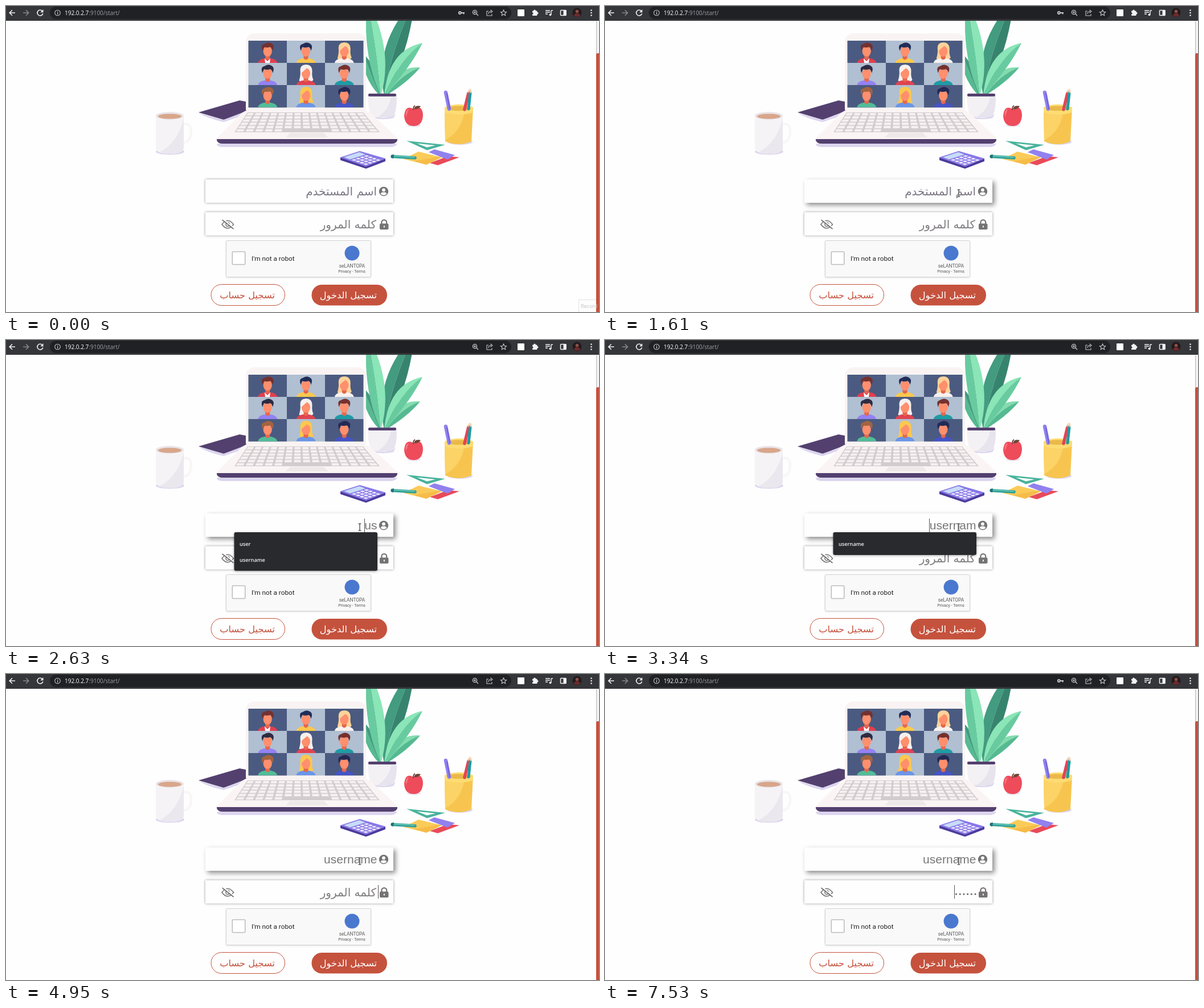
Animation, 1041 px wide and 538 px high, one loop 8 s. Source, as an HTML page with a canvas:

```html
<!DOCTYPE html>
<html lang="en">
<head>
<meta charset="utf-8">
<title>Login form</title>
<style>
html, body { margin: 0; width: 100%; height: 100%; overflow: hidden; background: #fefefe; }
canvas { display: block; width: 1041px; height: 538px; }
</style>
</head>
<body>
<canvas id="stage" width="1041" height="538"></canvas>
<script>
const W = 1041, H = 538, LOOP = 8000;
const RED = '#c5523d', GREY = '#757373', PAGE = '#fefefe';
const ARABIC = '"DejaVu Sans", sans-serif';
const UI = '"Open Sans", "Noto Sans", sans-serif';
const view = document.getElementById('stage').getContext('2d');
const backdrop = document.createElement('canvas');
backdrop.width = W;
backdrop.height = H;
let g = backdrop.getContext('2d');

// ---------- helpers ----------
function fill(color, d) {
  g.fillStyle = color;
  g.fill(new Path2D(d), 'evenodd');
}
function line(color, width, d) {
  g.strokeStyle = color;
  g.lineWidth = width;
  g.stroke(new Path2D(d));
}
function oval(color, x, y, rx, ry = rx) {
  g.fillStyle = color;
  g.beginPath();
  g.ellipse(x, y, rx, ry, 0, 0, Math.PI * 2);
  g.fill();
}
function ring(color, width, x, y, r) {
  g.strokeStyle = color;
  g.lineWidth = width;
  g.beginPath();
  g.arc(x, y, r, 0, Math.PI * 2);
  g.stroke();
}
function box(color, x, y, w, h, r = 0) {
  g.fillStyle = color;
  g.beginPath();
  g.roundRect(x, y, w, h, r);
  g.fill();
}
function frame(color, width, x, y, w, h, r = 0) {
  g.strokeStyle = color;
  g.lineWidth = width;
  g.beginPath();
  g.roundRect(x, y, w, h, r);
  g.stroke();
}
function text(str, x, y, font, color, align = 'left', dir = 'ltr') {
  g.font = font;
  g.fillStyle = color;
  g.direction = dir;
  g.textAlign = align;
  g.fillText(str, x, y);
}
function at(x, y, draw) {
  g.save();
  g.translate(x, y);
  draw();
  g.restore();
}
function shaded(color, blur, dx, dy, draw) {
  g.save();
  g.shadowColor = color;
  g.shadowBlur = blur;
  g.shadowOffsetX = dx;
  g.shadowOffsetY = dy;
  draw();
  g.restore();
}
const mix = (a, b, k) => a + (b - a) * k;

// ---------- browser bar ----------
function browserBar() {
  box('#35363a', 0, 0, W, 26);
  box('#202124', 77, 1, 810, 22, 11);
  const white = '#f1f3f4', dim = '#85888c', soft = '#c4c7ca';
  line(white, 1.6, 'M16 12H6.5M11 7.2L6.2 12L11 16.8');
  line(dim, 1.6, 'M30 12H39.5M35 7.2L39.8 12L35 16.8');
  line(white, 1.6, 'M64 9A5 5 0 1 0 64.8 13.2');
  fill(white, 'M65.5 6V11.2H60.3Z');
  ring(soft, 1.1, 90.5, 12, 4.8);
  box(soft, 90, 11, 1.2, 4);
  box(soft, 90, 9, 1.2, 1.2);
  const host = '192.0.2.7';
  text(host, 103, 15.5, '10px ' + UI, '#fff');
  text(':9100/start/', 103 + g.measureText(host).width, 15.5, '10px ' + UI, '#9aa0a6');
  ring(soft, 1.3, 823, 11, 3.6);
  line(soft, 1.4, 'M825.8 13.8L829 17M821.3 11H824.7M823 9.3V12.7');
  line(soft, 1.1, 'M847 9H844V17H853V14M847 14Q847 9.5 852 9.5M850.5 6.8L854 9.5L850.5 12.2');
  line(soft, 1.1, 'M873.5 6.8L875 10.2L878.6 10.6L875.9 13L876.7 16.6L873.5 14.7L870.3 16.6L871.1 13L868.4 10.6L872 10.2Z');
  box('#fff', 898, 6, 12, 12, 1);
  box(white, 924, 8.5, 8.5, 8.5, 1);
  oval(white, 928, 8.5, 1.9);
  oval(white, 932.6, 12.6, 1.9);
  oval('#35363a', 924.2, 13, 1.4);
  line(white, 1.4, 'M947 8H955M947 11H955M947 14H951M957 8V15M957 8H960');
  oval(white, 955.5, 15.3, 1.9);
  frame(white, 1.5, 973.5, 7.5, 9.5, 9, 1);
  box(white, 978.5, 7, 5, 10);
  oval('#231a1c', 1002.5, 11.5, 8);
  oval('#8c5148', 1002.5, 9.5, 2.8);
  fill('#6e2a2d', 'M997 17Q998 12.5 1002.5 12.5Q1007 12.5 1008 17Q1002.5 21 997 17Z');
  [7.5, 12, 16.5].forEach(y => oval(white, 1027.5, y, 1.3));
}
function keyIcon() {
  ring('#c4c7ca', 1.8, 796.8, 12, 2);
  line('#c4c7ca', 1.8, 'M799 12H805M803.5 12V14.5');
}

// ---------- illustration ----------
function leaf(x0, y0, x1, y1, cx, cy, w, colors) {
  const len = Math.hypot(x1 - x0, y1 - y0);
  const nx = -(y1 - y0) / len * w, ny = (x1 - x0) / len * w;
  [-1, 1].forEach((side, i) => fill(colors[i],
    `M${x0} ${y0}Q${cx + nx * side} ${cy + ny * side} ${x1} ${y1}Q${cx} ${cy} ${x0} ${y0}Z`));
}
function plant() {
  g.save();
  g.beginPath();
  g.rect(632, 26, 120, 180);
  g.clip();
  leaf(664, 158, 718, -12, 676, 75, 33, ['#439b80', '#37846e']);
  leaf(656, 158, 626, 82, 640, 118, 17, ['#55ba91', '#439b80']);
  leaf(666, 158, 727, 108, 693, 120, 19, ['#83dcae', '#55ba91']);
  leaf(664, 158, 731, 65, 691, 92, 25, ['#8ae5b7', '#68cb9f']);
  leaf(658, 158, 634, -12, 653, 82, 29, ['#68cb9f', '#8ae5b7']);
  g.restore();
  fill('#dcd5ee', 'M638 190Q662 204 684 190L680 197Q662 201 642 197Z');
  fill('#f4f1f5', 'M635 155H686Q686 187 679 194Q661 198 643 194Q635 186 635 155Z');
  fill('#e8e4ee', 'M676 160H686Q686 187 679 194Q664 198 651 196Q672 184 676 160Z');
  box('#54406f', 636, 154, 49, 5, 2);
}
function person(x, y, hair, shirt, long) {
  at(x, y, () => {
    if (long) fill(hair, 'M-10 13Q-10 3 0 3Q11 3 11 15Q10 23 13 30Q8 36 0 34Q-8 36 -12 31Q-9 22 -10 13Z');
    fill(shirt, 'M-17 39Q-16 33 -6 31H6Q16 33 17 39Z');
    fill('#e6674d', 'M-4 24H4V31Q0 36 -4 31Z');
    oval('#ff8f6d', 0, 18.5, 7.6, 9.6);
    fill(hair, long
      ? 'M-9 19Q-11 4 0 4Q11 4 9 19Q7 11 2 9Q-4 14 -9 19Z'
      : 'M-9 18Q-13 7 -6 6Q1 1 7 5Q13 8 9 18Q8 13 5 11Q-2 13 -6 11Q-8 14 -9 18Z');
  });
}
function laptop() {
  fill('#53406f', 'M338 187L410 166L426 169V186L382 200Z');
  fill('#dcd5ee', 'M338 188L382 200L424 184V190L382 204Q352 197 338 188Z');
  box('#f9f4f3', 421, 48, 211, 137, [15, 15, 4, 4]);
  const xs = [425.5, 493, 560, 627.5], ys = [61, 100, 139, 178.5];
  const people = [
    ['#74312f', '#e23f4e'], ['#222d57', '#fbc84f'], ['#fcd39a', '#f7f1ee', true],
    ['#2c2b43', '#9382f3'], ['#f5f0ee', '#df4451', true], ['#74312f', '#1e9ca5'],
    ['#a2643f', '#51bd98'], ['#fbc84f', '#6b95e8', true], ['#222a55', '#4453c6']
  ];
  people.forEach((p, i) => {
    const c = i % 3, r = Math.floor(i / 3);
    box(i % 2 ? '#b0bfd1' : '#4b5a80', xs[c], ys[r], xs[c + 1] - xs[c], ys[r + 1] - ys[r]);
    person((xs[c] + xs[c + 1]) / 2, ys[r], ...p);
  });
  fill('#fff', 'M454 92L459 97L464 92L463 100H455Z');
  fill('#dcd5ee', 'M371 242H687Q684 248 674 248H382Q372 248 370 244Z');
  fill('#faf5f4', 'M421 184H632L640 188L687 232V236H370V232L414 188Z');
  fill('#53406f', 'M370 234H687V236Q685 242 677 242H380Q372 242 370 236Z');
  fill('#d3cccf', 'M424 187H627L656 222H401Z');
  const left = y => mix(424, 401, (y - 187) / 35);
  const right = y => mix(627, 656, (y - 187) / 35);
  for (let row = 0; row < 6; row++) {
    const y = 188 + row * 5.7, b = y + 4.2;
    for (let k = 0; k < 15; k++) {
      if (row === 5 && k > 4 && k < 10) continue;
      const p = (k + 0.11) / 15, q = (k + 0.87) / 15;
      fill('#f5f0f1', `M${mix(left(y), right(y), p)} ${y}L${mix(left(y), right(y), q)} ${y}`
        + `L${mix(left(b), right(b), q)} ${b}L${mix(left(b), right(b), p)} ${b}Z`);
    }
  }
  fill('#eee8e9', 'M499 223H558L565 231H491Z');
}
function mug() {
  oval('#dcd5ee', 288, 256, 25, 5.5);
  line('#f9f6f6', 4.5, 'M311 208Q325 205 325 220Q325 239 311 240');
  fill('#f5f3f5', 'M263 193H312V250Q311 260 288 260Q264 260 263 250Z');
  fill('#eae7ee', 'M312 197V250Q311 260 288 260Q276 260 270 257Q302 240 312 197Z');
  oval('#e9e3e7', 287.5, 193, 24.5, 6.8);
  oval('#d8a68b', 287.5, 194, 20.5, 4.6);
}
function apple() {
  oval('#e7dff0', 716, 210, 12, 2.5);
  fill('#ee4b5b', 'M715 181Q731 172 732 192Q731 211 716 211Q700 211 699 193Q701 173 715 181Z');
  fill('#f7787f', 'M707 181Q700 183 702 196Q705 187 707 181Z');
  line('#6b3a32', 1.6, 'M715 183Q714 178 718 175');
  fill('#6e4536', 'M716 181Q718 174 728 176Q724 183 716 181Z');
}
function pencilCup() {
  oval('#dcd5ee', 797, 239, 22, 5);
  fill('#f7c54f', 'M770 179H820L817 238Q795 248 771 238Z');
  fill('#fbd367', 'M770 185H805Q800 220 771 236Z');
  fill('#fddc73', 'M770 178Q795 168 820 178V187Q795 195 770 187Z');
  oval('#ebb84a', 795, 180, 21, 4.3);
  g.lineCap = 'round';
  line('#8f80f0', 6.5, 'M772 152L778 181');
  line('#6c5ccf', 1.5, 'M774 154L779 181');
  line('#e04655', 5.5, 'M812 153L805 182');
  line('#1d9ba5', 5, 'M815 153L812 181');
  g.lineCap = 'butt';
  fill('#f5cda9', 'M809 152L814 145L815 153ZM812 152L816 145L818 153Z');
}
function deskItems() {
  fill('#48b39c', 'M703 237L771 244L739 253.5ZM721 241.5L739 248.5L754 245Z');
  fill('#e94a58', 'M744 276L776 264L796 266L758 280Z');
  fill('#9181ef', 'M742 257L752 252L788 262L775 270Z');
  fill('#fbcb59', 'M698 269L724 256L765 266L738 279Z');
  fill('#f6bc49', 'M716 273L760 265L765 266L738 279Z');
  g.lineCap = 'round';
  line('#31a097', 5.5, 'M678 264.5L718 267');
  line('#70cfbd', 1.5, 'M678 263.5L717 266');
  g.lineCap = 'butt';
  fill('#216f75', 'M676 262L681 261L680 268L676 267Z');
  fill('#4d3b9e', 'M587 266L632 282L666 268V273L632 286L587 271Z');
  fill('#8878e8', 'M587 266L621 255L666 268L632 282Z');
  g.save();
  g.transform(45, 16, 34, -11, 587, 266);
  box('#c7dcf7', 0.06, 0.1, 0.24, 0.8);
  for (let r = 0; r < 4; r++)
    for (let c = 0; c < 4; c++)
      box('#f1edfb', 0.36 + r * 0.15, 0.1 + c * 0.21, 0.105, 0.145);
  g.restore();
}

// ---------- form ----------
function pageParts() {
  shaded('rgba(0,0,0,.12)', 3, 0, 1, () => box('#f9f9f9', 386, 412, 255, 65, 2));
  frame('#d3d3d3', 1, 386.5, 412.5, 254, 64, 2);
  box('#fff', 397, 432, 23, 23, 1.5);
  frame('#bdbdbd', 1.6, 397.3, 432, 22.5, 22.5, 1.5);
  text("I'm not a robot", 431, 447.5, '11.8px Roboto, sans-serif', '#222');
  oval('#4a78cf', 607.5, 434.5, 13);
  text('seLANTOPA', 607.5, 460, '8.4px Roboto, sans-serif', '#5a5a5a', 'center');
  text('Privacy - Terms', 607, 469, '7px Roboto, sans-serif', '#555', 'center');
  frame(RED, 1, 360, 489.5, 129.5, 37, 18.5);
  text('تسجيل حساب', 472, 514, '16.3px ' + ARABIC, RED, 'right', 'rtl');
  box(RED, 536.5, 490, 132.5, 36.5, 18);
  text('تسجيل الدخول', 651, 514, '16.3px ' + ARABIC, '#fff', 'right', 'rtl');
}
function scrollbar(hover) {
  box('#f4f4f4', 1036, 26, 5, 60);
  box('#bcbcbc', 1036, 27, 1.2, 58);
  box(hover ? '#b94733' : '#c6503c', 1036, 83, 8, H, [3, 0, 0, 0]);
}
function field(y, h, raised) {
  const draw = () => box(PAGE, 350, y, 330, h, 1);
  if (raised) shaded('rgba(0,0,0,.45)', 8, 4, 4, draw);
  else shaded('rgba(0,0,0,.42)', 4, 0, 0, draw);
}
function fieldIcons() {
  oval(GREY, 663, 326, 8.2);
  oval(PAGE, 663, 323.4, 2.9);
  fill(PAGE, 'M657.7 330.5Q658.5 327.6 661 327.6H665Q667.5 327.6 668.3 330.5Q663 335 657.7 330.5Z');
  box(GREY, 656, 382.5, 15.5, 10.5, 2);
  line(GREY, 2.2, 'M659.4 383V380.5A4.4 4.4 0 0 1 668.2 380.5V383');
  box(PAGE, 663, 386, 1.8, 3.6, 0.9);
  line(GREY, 1.6, 'M379 384Q389 370.5 399.5 384Q389 397.5 379 384Z');
  ring(GREY, 1.5, 389.3, 384, 3.4);
  line(PAGE, 1.8, 'M381.5 375L400.5 390.5');
  line(GREY, 1.7, 'M379.5 376L399.5 392');
}
function caret(x, y) {
  box('#555', x, y, 1, 24);
}
function dropdown(items, alpha) {
  g.save();
  g.globalAlpha = alpha;
  shaded('rgba(0,0,0,.35)', 4, 0, 1,
    () => box('#292a2d', 400.5, 338, 251.5, 40 + (items.length - 1) * 27.7, 3));
  items.forEach((s, i) => text(s, 410, 361.8 + i * 27.7, '600 9.2px ' + UI, '#f3f4f5'));
  g.restore();
}
function recordBadge(alpha) {
  g.save();
  g.globalAlpha = alpha;
  box('#fdfdfd', 1005, 516, 31, 22);
  line('#e2e2e2', 1, 'M1036 516.5H1005.5V538');
  text('Record', 1009, 530.5, '9px ' + UI, '#c3c3c3');
  g.restore();
}
function arrow(x, y) {
  at(x, y, () => {
    const d = 'M.5 .5V13.5L3.4 10.8L5.6 16L7.9 15L5.7 10H9.8Z';
    fill('#fff', d);
    line('#111', 1, d);
  });
}
function beam(x, y) {
  const d = `M${x - 2.5} ${y - 5.5}H${x + 2.5}M${x - 2.5} ${y + 6.5}H${x + 2.5}M${x} ${y - 5.5}V${y + 6.5}`;
  line('rgba(255,255,255,.7)', 2.4, d);
  line('#222', 1.1, d);
}

// ---------- timeline ----------
const count = (times, t) => times.filter(s => t >= s).length;
const fadeTimes = [100, 200, 290, 390, 490];
const letterTimes = [2630, 2630, 2830, 3030, 3130, 3240, 3340, 3440];
const dotTimes = [5270, 5570, 5670, 5870, 7000, 7530];
const pointer = [[790, 1036, 419], [890, 1034, 419], [1190, 893, 418], [1290, 759, 394],
  [1410, 678, 362], [1510, 640, 339]];
const accounts = ['haronbelm', 'tolim', 'tolim2', 'haronbelm1', 'test', 'user'];

function suggestions(t, typed) {
  if (t < 1820 || t >= 3640) return null;
  if (!typed) return accounts;
  return typed < 5 ? ['user', 'username'] : ['username'];
}
function render(t) {
  g.drawImage(backdrop, 0, 0);
  if (t < 2630 || t >= 5270) keyIcon();
  scrollbar(t >= 790 && t < 890);
  recordBadge(1 - count(fadeTimes, t) / fadeTimes.length);

  field(305, 41, t >= 1510);
  field(362.5, 41, false);
  fieldIcons();

  const typed = count(letterTimes, t), dots = count(dotTimes, t);
  let nameWidth = 0;
  if (typed) {
    const word = 'username'.slice(0, typed);
    text(word, 651.5, 333, '21px "Liberation Sans", Arial, sans-serif', '#777', 'right');
    nameWidth = g.measureText(word).width;
  } else {
    text('اسم المستخدم', 651, 332.5, '20px ' + ARABIC, '#7c7784', 'right', 'rtl');
  }
  if (dots) {
    for (let i = 0; i < dots; i++) oval('#696969', 650 - i * 6.7, 387, 1.6);
  } else {
    text('كلمه المرور', 650, 390.5, '20px ' + ARABIC, '#7f7c80', 'right', 'rtl');
  }

  if (t >= 1710 && t < 3850 && !(t >= 2310 && t < 2630))
    caret(Math.round(651 - nameWidth), 314);
  if (t >= 3850 && !(t >= 4350 && t < 4950) && !(t >= 6400 && t < 7000))
    caret(Math.round(653 - dots * 6.7), 371);

  const list = suggestions(t, typed);
  if (list) dropdown(list, t >= 3540 ? 0.4 : 1);

  if (t >= 1710 && t < 1910) oval('rgba(255,240,60,.75)', 620.5, 328, 8.5);
  if (t >= 1610) beam(621, 328.5);
  else {
    const n = count(pointer.map(p => p[0]), t);
    if (n) arrow(pointer[n - 1][1], pointer[n - 1][2]);
  }
}

g.fillStyle = PAGE;
g.fillRect(0, 0, W, H);
plant();
laptop();
mug();
apple();
pencilCup();
deskItems();
pageParts();
browserBar();

g = view;
const start = performance.now();
function tick() {
  render((performance.now() - start) % LOOP);
  requestAnimationFrame(tick);
}
tick();
</script>
</body>
</html>
```
